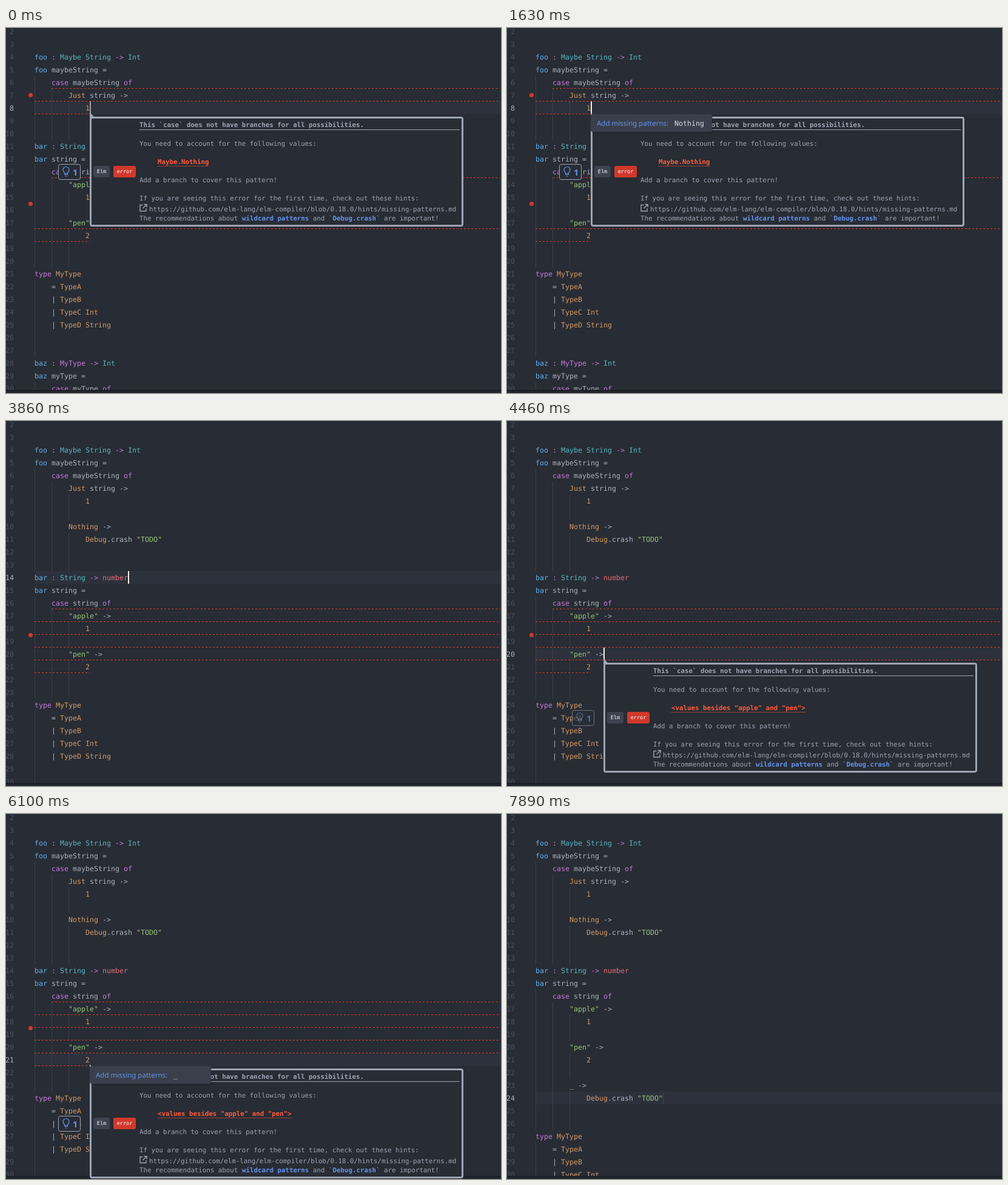
Animation of 816 by 601 pixels, one loop 8000 ms. Source, as an HTML page:

```html
<!DOCTYPE html>
<html lang="en">
<head>
<meta charset="utf-8">
<title>Add missing patterns</title>
<style>
html, body { margin: 0; width: 100%; height: 100%; overflow: hidden; background: #282c34; }
svg { display: block; width: 816px; height: 601px; }
text { font-family: "DejaVu Sans Mono", monospace; text-rendering: geometricPrecision; white-space: pre; }
</style>
</head>
<body>
<svg id="stage" viewBox="0 0 816 601">
  <g id="page"></g>
  <rect id="caret" width="2" height="21" fill="#f4efe6"/>
  <g id="overlay"></g>
</svg>
<script>
(() => {
const LOOP = 8000, FRAME = 148.9;
const CODE = 11.627, SMALL = 10.797;   // give 7 px and 6.5 px per character
const C = {
  text: '#abb2bf', blue: '#61afef', purple: '#c678dd', cyan: '#56b6c2', orange: '#d19a66',
  green: '#98c379', red: '#e06c75', dim: '#495162', guide: '#3b4048', active: '#2c313c',
  panel: '#9da5b4', link: '#6494ed', error: '#d0392b', dash: '#e03a24'
};

const foo = ['foo : Maybe String -> Int', 'foo maybeString =', '    case maybeString of',
  '        Just string ->', '            1'];
const bar = ['bar : String -> number', 'bar string =', '    case string of',
  '        "apple" ->', '            1', '', '        "pen" ->', '            2'];
const rest = ['type MyType', '    = TypeA', '    | TypeB', '    | TypeC Int', '    | TypeD String', '', '',
  'baz : MyType -> Int', 'baz myType =', '    case myType of'];
const crash = '            Debug.crash "TODO"';
const gap = ['', ''];
const fooFull = [...foo, '', '        Nothing ->', crash];
const barFull = [...bar, '', '        _ ->', crash];
const docs = [
  [...foo, ...gap, ...bar, ...gap, ...rest],
  [...fooFull, ...gap, ...bar, ...gap, ...rest],
  [...fooFull, ...gap, ...barFull, ...gap, ...rest]
].map(d => ['', '', ...d].slice(0, 29));   // first entry is line 2

// Each step changes some fields of the state; a step with a line moves the caret.
const steps = [
  { at: -460, doc: 0, line: 8, fooErr: 1, barErr: 1, popup: 1, bulb: 1, menu: '' },
  { at: 1025, menu: 'Nothing' },
  { at: 2520, doc: 1, line: 11, barErr: 2, popup: 0, bulb: 0, menu: '' },
  { at: 2970, fooErr: 0 },
  { at: 3570, line: 12 },
  { at: 3720, line: 13 },
  { at: 3860, line: 14 },
  { at: 4010, line: 16 },
  { at: 4160, line: 20, popup: 2 },
  { at: 4460, bulb: .6 },
  { at: 4610, line: 21, bulb: 0 },
  { at: 4910, bulb: .6 },
  { at: 5060, bulb: 1 },
  { at: 5950, menu: '_' },
  { at: 7300, doc: 2, line: 24, popup: 0, bulb: 0, menu: '' },
  { at: 7600, barErr: 0 }
];

const lineY = n => 21 * n - 47;
const esc = s => s.replace(/&/g, '&amp;').replace(/</g, '&lt;').replace(/>/g, '&gt;');
const text = (x, y, s, fill, size = CODE, more = '') =>
  `<text x="${x}" y="${y}" fill="${fill}" font-size="${size}" ${more}>${esc(s)}</text>`;
const rect = (x, y, w, h, fill, more = '') =>
  `<rect x="${x}" y="${y}" width="${w}" height="${h}" fill="${fill}" ${more}/>`;
const hline = (x1, x2, y, color, dash = 'none') =>
  `<path d="M${x1} ${y + .5}H${x2}" stroke="${color}" stroke-dasharray="${dash}"/>`;
const dashes = (x1, x2, line) => hline(x1, x2, lineY(line) + 20, C.dash, '3 3');
const dot = y => `<circle cx="40.5" cy="${y}" r="3.5" fill="${C.error}"/>`;

function tokenColor(word, index, typed) {
  if (word[0] === '"') return C.green;
  if (/^(case|of|type)$/.test(word)) return C.purple;
  if (index === 0) return C.blue;
  if (typed) {
    if (/^(:|->|MyType)$/.test(word)) return C.purple;
    return word === 'number' ? C.red : C.cyan;
  }
  return /^[A-Z0-9]/.test(word) ? C.orange : C.text;
}

function codeLine(s, n) {
  const typed = s.includes(' : ');
  return [...s.matchAll(/"[^"]*"|\.?\w+|[^\s\w".]+/g)]
    .map(m => text(47 + 7 * m.index, lineY(n) + 15, m[0], tokenColor(m[0], m.index, typed)))
    .join('');
}

// A blank line takes the deeper indent of its neighbours.
function depth(doc, i) {
  const level = s => s ? s.search(/\S/) / 4 : 0;
  if (doc[i]) return level(doc[i]);
  const before = doc.slice(0, i).reverse().find(Boolean);
  const after = doc.slice(i).find(Boolean);
  return Math.max(level(before), level(after));
}

function errors(s) {
  let out = '';
  if (s.fooErr) out += dashes(75, 814, 6) + dashes(47, 814, 7) + dashes(47, 138, 8) + dot(110.5);
  if (s.barErr === 1) out += dashes(75, 814, 13) + dashes(47, 814, 17) + dashes(47, 138, 18) + dot(289.5);
  if (s.barErr === 2) {
    for (let n = 16; n <= 21; n++) out += dashes(n === 16 ? 75 : 47, n === 21 ? 138 : 814, n);
    out += dot(352.5);
  }
  return out;
}

function page(s) {
  const doc = docs[s.doc];
  let out = rect(0, 0, 816, 601, '#282c34') + rect(47, lineY(s.line), 769, 21, C.active);
  doc.forEach((str, i) => {
    const n = i + 2;
    for (let d = 0; d < depth(doc, i); d++) out += rect(47 + 28 * d, lineY(n), 1, 21, C.guide);
    out += text(13, lineY(n) + 15, String(n), n === s.line ? C.text : C.dim, CODE, 'text-anchor="end"');
    out += codeLine(str, n);
  });
  return out + errors(s) + rect(0, 596, 816, 1, '#181a1f') + rect(0, 597, 816, 4, '#21252b');
}

// Panels are drawn relative to the upper left of the caret cell.
function popup(kind) {
  const bold = 'font-weight="700"';
  const say = (x, y, s, color = C.panel, more = '') => text(x, y, s, color, SMALL, more);
  const badge = (x, w, s, fill) => rect(x, 106, w, 19, fill, 'rx="3"') +
    text(x + w / 2, 118, s, '#fff', 8.5, 'text-anchor="middle"');
  const value = kind === 1 ? 'Maybe.Nothing' : '<values besides "apple" and "pen">';
  return rect(1.5, 26.5, 613, 178, '#282c34', `rx="2.5" stroke="${C.panel}" stroke-width="3"`) +
    `<path d="M0 18L9 27H0Z" fill="${C.panel}"/>` +
    badge(6, 27, 'Elm', '#3e4350') + badge(39, 37, 'error', C.error) +
    say(82, 42, 'This `case` does not have branches for all possibilities.', C.panel, bold) +
    hline(82, 610, 46, C.panel) +
    say(82, 73, 'You need to account for the following values:') +
    say(112, 103, value, '#ff5c3d', bold) +
    hline(112, 112 + 6.5 * value.length, 106, '#ff5c3d', '1 1') +
    say(82, 133, 'Add a branch to cover this pattern!') +
    say(82, 163, 'If you are seeing this error for the first time, check out these hints:') +
    `<path d="M87.5 170.5H83V180.5H93V176M89.5 169.5H94V174M94 169.5L87.5 176" fill="none" stroke="${C.panel}" stroke-width="1.4"/>` +
    say(98, 181, 'https://github.com/elm-lang/elm-compiler/blob/0.18.0/hints/missing-patterns.md') +
    say(82, 196, 'The recommendations about') +
    say(251, 196, 'wildcard patterns', C.link, bold) +
    say(368, 196, 'and `') +
    say(400.5, 196, 'Debug.crash', C.link, bold) +
    say(472, 196, '` are important!');
}

const bulb = opacity => `<g opacity="${opacity}">` +
  rect(-51.5, 103.5, 36, 25, '#282c34', `rx="3" stroke="${C.panel}"`) +
  `<path d="M-41.5 118.5C-41.5 116.5-44 115.5-44 112.5A5 5 0 0 1-34 112.5C-34 115.5-36.5 116.5-36.5 118.5V120.5H-41.5ZM-41.5 118.5H-36.5M-40.5 123H-37.5" fill="none" stroke="${C.link}" stroke-width="1.2"/>` +
  text(-28, 122, '1', C.link, 14, 'font-weight="700" style="font-family:\'Noto Sans\',sans-serif"') + '</g>';

const menu = choice => rect(2, 23, 200, 30, '#000', 'rx="3" opacity=".12"') +
  rect(0, 21, 200, 29, '#3a3f4b', 'rx="3"') +
  text(10, 40, 'Add missing patterns:', C.link, 11.5, 'style="font-family:\'Noto Sans\',sans-serif"') +
  text(138, 40, choice, '#d7dae0');

const panels = s => (s.popup ? popup(s.popup) : '') + (s.bulb ? bulb(s.bulb) : '') + (s.menu ? menu(s.menu) : '');

// Solid for 400 ms after a move, then toggles every 400 ms with a 250 ms fade.
function blink(since) {
  const t = since - 400;
  if (t < 0) return 1;
  const p = Math.min(1, t % 400 / 250);
  const ease = 1 - Math.pow(1 - p, 2);
  return Math.floor(t / 400) % 2 ? ease : 1 - ease;
}

const [pageEl, caretEl, overlayEl] = ['page', 'caret', 'overlay'].map(id => document.getElementById(id));
let shown = -1;

function render(t) {
  const state = {};
  let count = 0, moved = 0;
  for (const step of steps) {
    if (step.at > t) break;
    Object.assign(state, step);
    if (step.line) moved = step.at;
    count++;
  }
  if (count !== shown) {
    shown = count;
    const x = 47 + 7 * Math.min(30, docs[state.doc][state.line - 2].length);
    const y = lineY(state.line);
    pageEl.innerHTML = page(state);
    caretEl.setAttribute('x', x);
    caretEl.setAttribute('y', y);
    overlayEl.setAttribute('transform', `translate(${x} ${y})`);
    overlayEl.innerHTML = panels(state);
  }
  const held = Math.max(moved, Math.floor((t + 5) / FRAME) * FRAME);
  caretEl.setAttribute('opacity', blink(held - moved).toFixed(3));
}

function tick() {
  render(performance.now() % LOOP);
  requestAnimationFrame(tick);
}
tick();
})();
</script>
</body>
</html>
```
